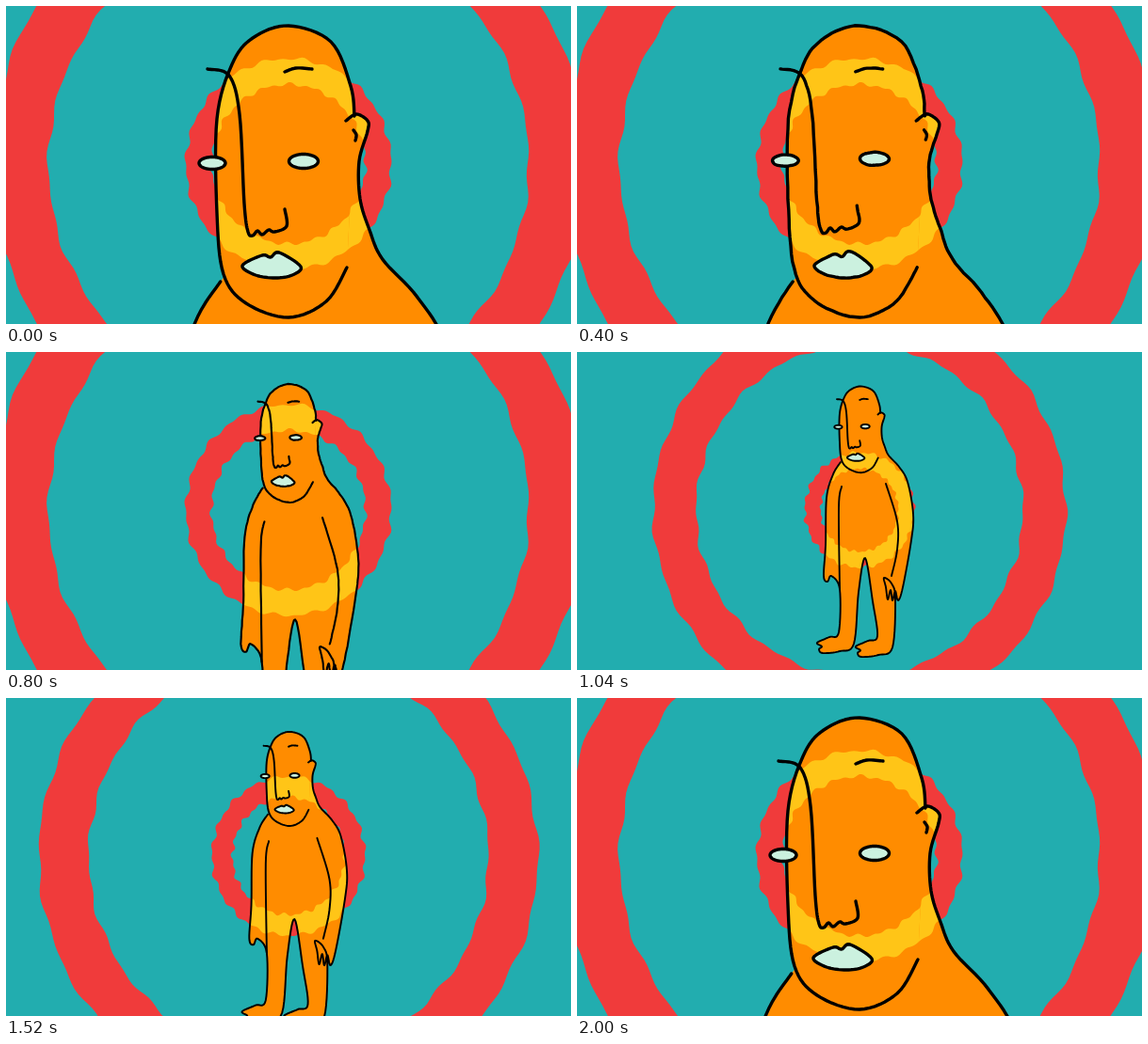
Recreate the animation shown at these times as an HTML page with a canvas. Size 600x338 px, loop 2.04 s.

```html
<!DOCTYPE html>
<html>
<head>
<meta charset="utf-8">
<style>
html, body { margin: 0; width: 100%; height: 100%; overflow: hidden; background: #22adaf; }
canvas { display: block; }
</style>
</head>
<body>
<canvas id="stage" width="600" height="338"></canvas>
<script>
const ctx = document.getElementById('stage').getContext('2d');
const TEAL = '#22adaf', RED = '#f03b3b', ORANGE = '#ff8c00', YELLOW = '#ffc517', PALE = '#cbf1df';
const FRAMES = 51, STEP = 40;
const FAR = .296, CX = 302, CY = 43; // smallest zoom and its fixed point

const pts = s => s.split(' ').map(p => p.split(',').map(Number));
// Points drawn at full-figure size, converted to close-up size.
const far = s => pts(s).map(([x, y]) => [CX + (x - CX) / FAR, CY + (y - CY) / FAR]);
const foot = (dx, dy) => far('294,310 279,318 261,320 257,316 260,313 255,309 268,303 278,298')
  .map(([x, y]) => [x + dx / FAR, y + dy / FAR]);
const oval = (x, y, rx, ry) => Array.from({ length: 12 }, (_, i) =>
  [x + rx * Math.cos(i * Math.PI / 6), y + ry * Math.sin(i * Math.PI / 6)]);

const head = pts('362,278 340,314 300,331 255,316 231,285 224,220 224,120 240,62 262,34 300,21 345,38 366,85 370,117');
const torso = [
  ...pts('361,122 372,115 384,122 384,133 375,165 376,205 386,238'),
  ...far('331,110 342,122 351,138 357,172 355,200 346,250'),
  ...far('341,264 338,254 335,264 333,253 330,263 328,250 326,240 334,246 338,262'),
  ...foot(41, 4), ...far('314,265 306,219 299,255'), ...foot(0, 0),
  ...far('279,252 270,238 266,244 262,238 264,205 265,155 272,130 280,117')
];
const arms = [far('281,143 278,165 279,252'), far('328,140 340,180 340,210 334,238')];
const nose = pts('214,67 237,74 248,115 253,210 257,240 262,244 267,239 272,243 279,238 285,240 298,234 296,216');
const brow = pts('296,70 308,66 325,67');
const earMark = pts('369,132 372,137 371,143');
const leftEye = oval(219, 167, 14, 6.5), rightEye = oval(316, 165, 15.5, 7.5);
const mouth = pts('251,276 272,265 281,267 290,262 313,277 304,286 286,289 265,286');
const cheek = [pts('316,157 330,153 341,160 344,182'), pts('317,173 336,180 341,200')];

const ramp = (a, b, v) => {
  const u = Math.max(0, Math.min(1, (v - a) / (b - a)));
  return u * u * (3 - 2 * u);
};

// Melting squeezes the figure, lifts the middle of the face and ripples every line.
function pose(x, y, { zoom, melt }, slide) {
  const squeeze = .08 + .2 * ramp(230, 340, y);
  const lift = 34 * Math.exp(-(((y - 205) / 55) ** 4));
  const dx = (300 - x) * squeeze + slide + 2 * Math.sin(y * .21 + x * .05) + 1.2 * Math.sin(y * .5);
  const dy = 1.8 * Math.sin(x * .25) + Math.sin(x * .55) - lift;
  return [CX + (x + melt * dx - CX) * zoom, CY + (y + melt * dy - CY) * zoom];
}

// Smooth curve through the points, posed sample by sample.
function curve(p, q, closed = false, slide = 0) {
  const path = new Path2D(), n = p.length, last = closed ? n : n - 1;
  const at = i => closed ? p[(i + n) % n] : p[Math.max(0, Math.min(n - 1, i))];
  for (let s = 0; s <= last * 8; s++) {
    const i = Math.floor(s / 8), t = s / 8 - i;
    const [a, b, c, d] = [at(i - 1), at(i), at(i + 1), at(i + 2)];
    const mix = k => b[k] + t / 2 * (c[k] - a[k] + t * (2 * a[k] - 5 * b[k] + 4 * c[k] - d[k]
      + t * (3 * (b[k] - c[k]) + d[k] - a[k])));
    path.lineTo(...pose(mix(0), mix(1), q, slide));
  }
  if (closed) path.closePath();
  return path;
}

function edge(path, r, seed) {
  const amp = Math.min(1.2, r * .02);
  for (let i = 0; i < 240; i++) {
    const a = i / 120 * Math.PI;
    const k = r + amp * (Math.sin(a * 19 + seed) + Math.sin(a * 31 + seed * 2));
    path[i ? 'lineTo' : 'moveTo'](300 + k * Math.cos(a), 168 + (k + 3) * Math.sin(a));
  }
  path.closePath();
}

// Rings grow faster the larger they are; each fifth size is visible at once.
function ringsAt(f) {
  const path = new Path2D();
  for (let n = (Math.floor(f / 2) + 4) % 5; n < 11; n += 5) {
    edge(path, 25 + 12 * n + 2.25 * n * n, n);
    edge(path, 17 + 8 * n + 2.05 * n * n, n + 2);
  }
  return path;
}

function fill(path, color, rule) {
  ctx.fillStyle = color;
  ctx.fill(path, rule);
}

function spike(x, y, h) {
  fill(new Path2D(`M${x - 5} ${y}L${x} ${y - h}L${x + 3} ${y - h}L${x + 4} ${y}Z`), PALE);
}

function draw(f) {
  const melt = ramp(9, 14, f) - ramp(14, 22, f);
  const zoom = 1 - (1 - FAR) * (ramp(14, 22, f) - ramp(37, 45.5, f));
  const q = { zoom, melt }, melted = melt > .7, rings = ringsAt(f);
  const skull = curve(head, q), body = curve(torso, q);

  ctx.fillStyle = TEAL;
  ctx.fillRect(0, 0, 600, 338);
  fill(rings, RED, 'evenodd');
  for (const shape of [body, skull]) {
    ctx.save();
    ctx.clip(shape);
    ctx.fillStyle = ORANGE;
    ctx.fillRect(0, 0, 600, 338);
    fill(rings, YELLOW, 'evenodd');
    ctx.restore();
  }

  ctx.strokeStyle = '#000';
  ctx.lineCap = ctx.lineJoin = 'round';
  ctx.lineWidth = 1.25 + 2.15 * zoom;
  const lines = [body, skull, curve(nose, q, false, 12), ...[...arms, brow].map(p => curve(p, q))];
  if (zoom > .95) lines.push(curve(earMark, q));
  if (melted) lines.push(...cheek.map(p => curve(p, { zoom: 1, melt: 0 })));
  lines.forEach(p => ctx.stroke(p));

  const blob = (p, color, slide) => {
    const path = curve(p, q, true, slide);
    fill(path, color);
    ctx.stroke(path);
  };
  blob(leftEye, PALE, 14);
  blob(rightEye, melted ? RED : PALE);
  if (melted) ctx.setLineDash([34, 13]);
  blob(mouth, PALE);
  ctx.setLineDash([]);
  if (melted) {
    spike(247, 139, 11);
    spike(321, 135, 11);
    spike(301, 266, 18);
    spike(288, 284, -14);
  }
}

function tick(now) {
  draw(Math.floor(now / STEP) % FRAMES);
  requestAnimationFrame(tick);
}
draw(0);
requestAnimationFrame(tick);
</script>
</body>
</html>
```
